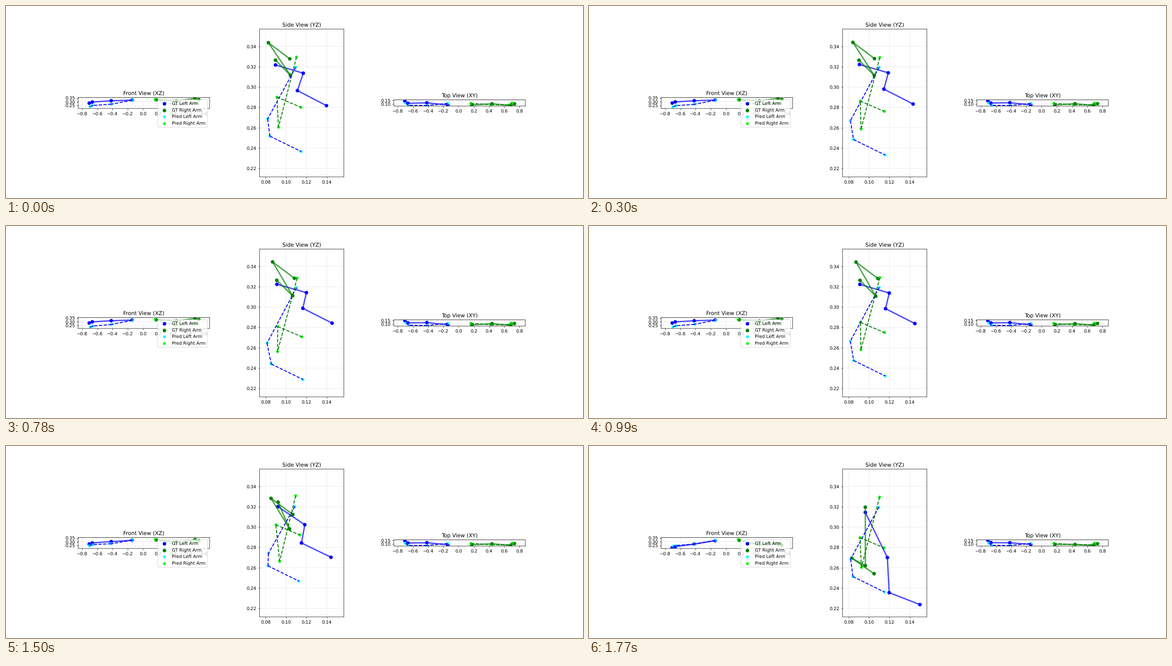
Animation of 1280x427 px, one loop 1.8 s. Source, as a matplotlib script:

```python
import numpy as np
import matplotlib.pyplot as plt
from matplotlib.animation import FuncAnimation

W, H = 1280, 427
FRAMES, STEP = 60, 30
DPI = W / 18

plt.rcParams.update({"font.family": "DejaVu Sans", "text.hinting": "none",
                     "path.snap": False})

u = np.linspace(0, 1, FRAMES)


def poses(x, yz):
    """Join constant or moving x (.., joint) with yz given in 1e-4 units."""
    x = np.broadcast_to(x, yz.shape[:2])
    return np.dstack([x, yz / 1e4])


def gt_arm(x, start, swing, drop, skew):
    """Sway out and back along a skewed half sine while dropping ever faster."""
    sway = np.sin(np.pi * u ** skew)[:, None, None]
    fall = (u[:, None] ** [8, 8, 9.3, 9.3])[:, :, None]
    return poses(x, np.array(start) + sway * swing + fall * drop)


def smooth(keys, vals):
    """Cubic Hermite curve through a few key values."""
    k, v, f = np.array(keys, float), np.array(vals, float), np.arange(FRAMES)
    m = np.gradient(v, k)
    i = np.clip(np.searchsorted(k, f, side="right") - 1, 0, len(k) - 2)
    h = k[i + 1] - k[i]
    s = (f - k[i]) / h
    return ((1 + 2 * s) * (1 - s) ** 2 * v[i] + s * (1 - s) ** 2 * h * m[i]
            + s * s * (3 - 2 * s) * v[i + 1] + s * s * (s - 1) * h * m[i + 1])


# How far the predicted arms sink below their first pose.
sink = smooth([0, 10, 18, 20, 24, 33, 43, 50, 54, 59],
              [0, .42, .55, .78, 1, .55, -.06, -1.3, -1.3, .05])


def pred_arm(x, start, move):
    yz = np.array(start) + sink[:, None, None] * move
    lift = (yz[:, 3:, 1] - yz[0, 3, 1]) / 1e4
    return poses(np.array(x) * (1 + 0.8 * lift), yz)


# Joints run shoulder, elbow, wrist, hand; each pair is (y, z).
arms = [
    gt_arm([-.143, -.418, -.667, -.707],
           [(897, 3217), (1169, 3136), (1112, 2965), (1397, 2817)],
           [(14, 7), (31, 6), (53, 23), (55, 25)],
           [(67, -73), (11, -436), (86, -610), (102, -579)], 0.85),
    gt_arm([.172, .438, .684, .734],
           [(897, 3264), (1043, 3116), (827, 3436), (1037, 3277)],
           [(14, -1), (24, -5), (46, 9), (50, 7)],
           [(67, -69), (-79, -495), (4, -742), (13, -736)], 1.25),
    pred_arm([-.143, -.416, -.660, -.698],
             [(1096, 3195), (820, 2687), (842, 2517), (1149, 2366)],
             [(7, -5), (-6, -42), (14, -78), (18, -79)]),
    pred_arm([.159, .427, .668, .698],
             [(1103, 3295), (926, 2605), (911, 2901), (1147, 2800)],
             [(6, -10), (-9, -44), (8, -93), (9, -94)]),
]

GT_LINE = dict(ls="-", lw=3, alpha=0.7)
PRED_LINE = dict(ls="--", lw=2)
STYLES = [
    ("GT Left Arm", "blue", 50, "b", GT_LINE),
    ("GT Right Arm", "green", 50, "g", GT_LINE),
    ("Pred Left Arm", "cyan", 30, "b", PRED_LINE),
    ("Pred Right Arm", "lime", 30, "g", PRED_LINE),
]

LIMITS = [(-0.853, 0.876), (0.0741, 0.1567), (0.2117, 0.3570)]
X_TICKS = np.arange(-4, 5) / 5
VIEWS = [
    ("Front View (XZ)", 0, 2, X_TICKS, [0.25, 0.30, 0.35]),
    ("Side View (YZ)", 1, 2, np.arange(4, 8) / 50, np.arange(11, 18) / 50),
    ("Top View (XY)", 0, 1, X_TICKS, [0.10, 0.15]),
]

fig, axes = plt.subplots(1, 3, figsize=((W + 1e-6) / DPI, (H + 1e-6) / DPI),
                         dpi=DPI, facecolor="white")
fig.subplots_adjust(left=0.125, right=0.9, bottom=0.11, top=0.88, wspace=0.2)

parts = []
for ax, (title, a, b, xt, yt) in zip(axes, VIEWS):
    ax.set_title(title)
    ax.set_xticks(xt)
    ax.set_yticks(yt)
    ax.set_xlim(LIMITS[a])
    ax.set_ylim(LIMITS[b])
    ax.set_aspect("equal")
    ax.grid(True, alpha=0.3)
    ax.set_autoscale_on(False)
    for pts, (label, dot, size, color, line) in zip(arms, STYLES):
        path = pts[:, :, [a, b]]
        # One size per dot keeps the dots off the whole-pixel grid.
        dots = ax.scatter(*path[0].T, c=dot, s=[size] * 4, label=label)
        # Every bone is its own line, so dashes restart at each joint.
        bones = [ax.plot([], [], color=color, **line)[0] for _ in range(3)]
        parts.append((path, dots, bones))
axes[0].legend(loc="upper right")


def draw(i):
    changed = []
    for path, dots, bones in parts:
        dots.set_offsets(path[i])
        for j, bone in enumerate(bones):
            bone.set_data(*path[i, j:j + 2].T)
        changed += [dots, *bones]
    return changed


anim = FuncAnimation(fig, draw, frames=FRAMES, interval=STEP,
                     repeat=True, repeat_delay=0, blit=False)
plt.show()
```
